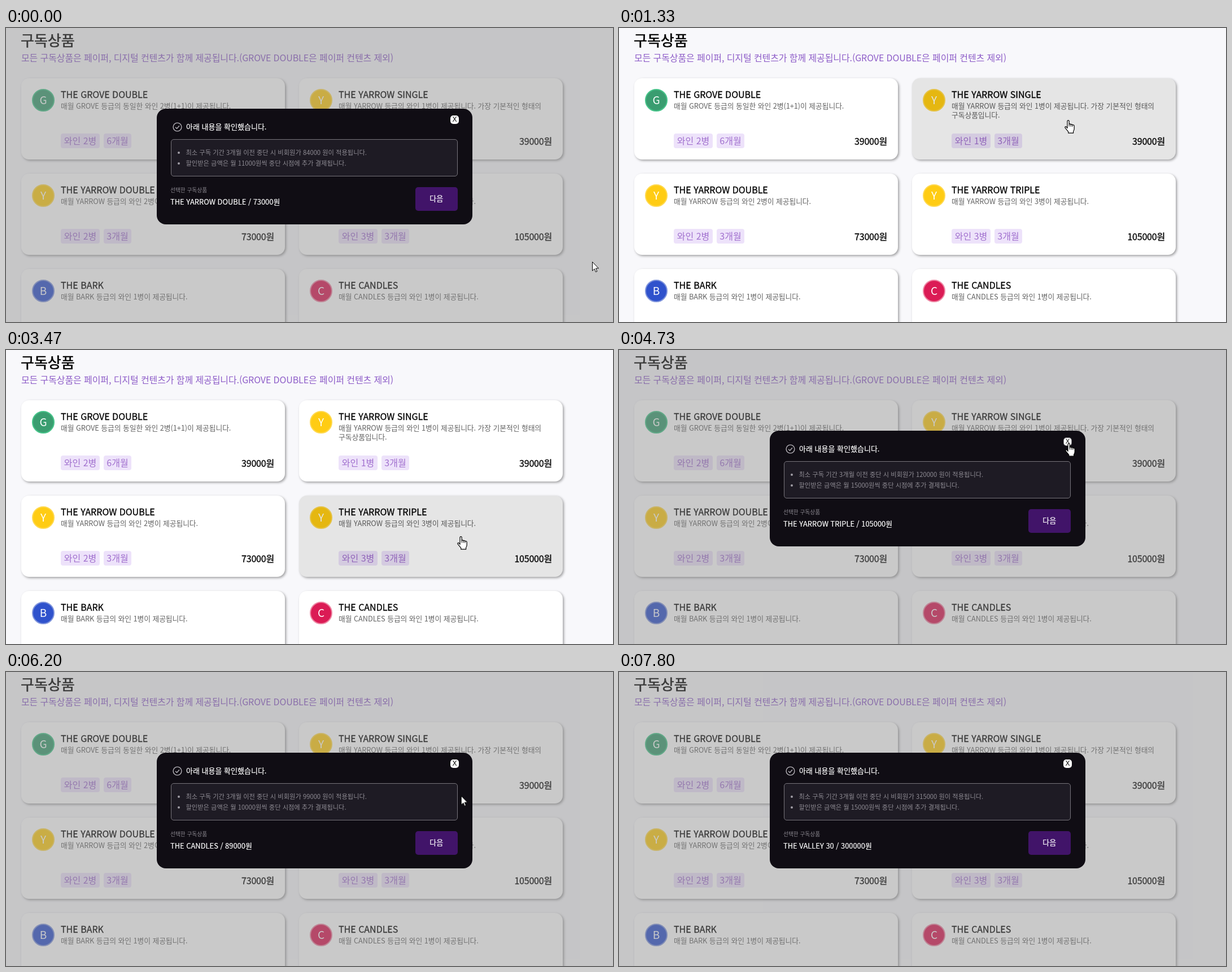
Recreate the animation shown at these times as an HTML page. Size 1075 px wide and 521 px high, loop 8000 ms.

```html
<!DOCTYPE html>
<html lang="ko">
<head>
<meta charset="utf-8">
<title>구독상품</title>
<style>
  html, body { margin: 0; width: 100%; height: 100%; overflow: hidden; }
  body {
    position: relative;
    background: #f8f8fb;
    color: #000;
    font: 400 16px/20px "Noto Sans CJK KR", "Noto Sans CJK", "Noto Sans", sans-serif;
  }
  div, span, svg { position: absolute; box-sizing: border-box; white-space: pre; }
  #stage { inset: 0; overflow: hidden; }
  h1 {
    position: absolute; margin: 0; left: 26px; top: 1px;
    font-size: 26px; line-height: 40px; font-weight: 400; -webkit-text-stroke: .6px;
  }
  .lead { left: 27px; top: 42px; font-weight: 300; letter-spacing: -.1px; color: #8d5cc8; }

  .card { width: 467px; height: 144px; border-radius: 14px; background: #fff; box-shadow: 2px 2px 4px rgba(0, 0, 0, .36); }
  .badge {
    left: 19px; top: 19px; width: 40px; height: 40px; border: 2px solid; border-radius: 50%;
    color: #fff; font-size: 19px; line-height: 34px; text-align: center;
  }
  .name, .price { -webkit-text-stroke: .3px; }
  .name { left: 70px; top: 18px; }
  .desc { left: 70px; top: 41px; font-size: 12.8px; line-height: 16px; font-weight: 300; letter-spacing: -.06px; color: #636363; }
  .chip {
    left: 70px; top: 98px; width: 69px; height: 26px; border-radius: 4px; background: #ede2fa;
    color: #a06fce; font-weight: 300; line-height: 25px; text-align: center;
  }
  .chip + .chip { left: 146px; width: 49px; }
  .price { right: 19px; top: 101px; letter-spacing: -.2px; }
  .shade { inset: 0; border-radius: 14px; background: rgba(0, 0, 0, .1); opacity: 0; }

  .veil { inset: 0; background: rgba(132, 132, 132, .44); }
  .modal { left: 267px; top: 143px; width: 558.5px; height: 205px; border-radius: 16px; background: #100d14; color: #fff; }
  .check { left: 28px; top: 24px; }
  .head { left: 52px; top: 21.5px; font-size: 13px; -webkit-text-stroke: .2px; }
  .box { left: 24.5px; top: 54px; width: 508px; height: 66px; border: 1px solid #77747b; border-radius: 5px; background: #1e1b24; }
  .box span { left: 26px; font-size: 11.25px; font-weight: 300; color: #8e8b93; }
  .box span::before {
    content: ""; position: absolute; left: -15px; top: 9px; width: 4px; height: 4px;
    border-radius: 50%; background: #a19ea6;
  }
  .label { left: 24px; top: 134px; font-size: 9.7px; font-weight: 300; color: #8e8b93; }
  .pick { left: 24px; top: 154.5px; font-size: 12.9px; -webkit-text-stroke: .2px; }
  .next {
    left: 458px; top: 138.5px; width: 74.5px; height: 42px; border-radius: 5px; background: #411469;
    font-size: 13px; line-height: 40px; text-align: center; -webkit-text-stroke: .2px;
  }
  .close {
    left: 520px; top: 12px; width: 15px; height: 15px; border-radius: 5px; background: #fff;
    color: #000; font: 12px/15px "Liberation Sans", sans-serif; text-align: center;
  }
  #cursor { left: 0; top: 0; width: 0; height: 0; }
  #cursor svg { left: 0; top: 0; overflow: visible; stroke: #000; fill: #fff; stroke-linejoin: round; }
  #cursor #hand { left: -6px; }
</style>
</head>
<body>
<div id="stage">
  <h1>구독상품</h1>
  <span class="lead">모든 구독상품은 페이퍼, 디지털 컨텐츠가 함께 제공됩니다.(GROVE DOUBLE은 페이퍼 컨텐츠 제외)</span>
  <div id="cards"></div>
  <div id="modals"></div>
  <div id="cursor">
    <svg id="arrow" width="12" height="19" viewBox="0 0 12 19">
      <path d="M.5 .5V16.2L4.1 12.8L6.4 18.3L8.8 17.3L6.5 11.9H11.5Z"/>
    </svg>
    <svg id="hand" width="18" height="24" viewBox="0 0 18 24">
      <path stroke-width="1.2" d="M5 14.5V2.4Q5 .7 6.6 .7T8.2 2.4V7.4Q9.7 6.3 11.1 8Q12.7 7 13.9 8.7Q17.2 8 17.2 11.2V15.5Q17.2 18 15.6 20V23.2H6.8V20.8L1.3 14.2Q.3 12.3 1.8 11.7Q3.2 11.4 5 14.5Z"/>
      <path fill="none" d="M8.2 7.4V11.5M11.1 8V11.8M13.9 8.7V12"/>
    </svg>
  </div>
</div>
<script>
const LOOP = 8000;
const $ = id => document.getElementById(id);

function add(parent, cls, text = '') {
  const el = document.createElement(cls.startsWith('.') ? 'span' : 'div');
  el.className = cls.replace('.', '');
  el.textContent = text;
  parent.append(el);
  return el;
}

// Each key is [ms, value, easing towards the next key].
function track(el, prop, keys, easing = 'linear') {
  const last = keys[keys.length - 1];
  const all = last[0] < LOOP ? [...keys, [LOOP, last[1]]] : keys;
  el.animate(
    all.map(([ms, value, ease]) => ({ offset: ms / LOOP, [prop]: value, easing: ease || easing })),
    { duration: LOOP, iterations: Infinity });
}

// Shows an element only inside the given [from, to] spans.
function show(el, spans, on = 1, off = 0, prop = 'opacity') {
  const keys = spans[0][0] ? [[0, off]] : [];
  for (const [from, to] of spans) {
    keys.push([from, on]);
    if (to < LOOP) keys.push([to, off]);
  }
  track(el, prop, keys, 'steps(1, end)');
}

const GREEN = ['#3a9d70', '#47c48a'], YELLOW = ['#ffcc14', '#ffd94f'];
const BLUE = ['#2f52cc', '#8095dc'], RED = ['#db1b55', '#ee86a3'];
const cards = [
  ['GROVE DOUBLE', GREEN, '동일한 와인 2병(1+1)이 제공됩니다.', 2, 6, 39000],
  ['YARROW SINGLE', YELLOW, '와인 1병이 제공됩니다. 가장 기본적인 형태의\n구독상품입니다.', 1, 3, 39000],
  ['YARROW DOUBLE', YELLOW, '와인 2병이 제공됩니다.', 2, 3, 73000],
  ['YARROW TRIPLE', YELLOW, '와인 3병이 제공됩니다.', 3, 3, 105000],
  ['BARK', BLUE, '와인 1병이 제공됩니다.', 1, 3, 45000],
  ['CANDLES', RED, '와인 1병이 제공됩니다.', 1, 3, 89000]
];

const shades = cards.map(([name, [fill, rim], text, bottles, months, price], i) => {
  const card = add($('cards'), 'card');
  card.style.left = (i % 2 ? 519 : 27) + 'px';
  card.style.top = 88.6 + (i >> 1) * 169.4 + 'px';
  const badge = add(card, 'badge', name[0]);
  badge.style.background = fill;
  badge.style.borderColor = rim;
  add(card, '.name', 'THE ' + name);
  add(card, '.desc', `매월 ${name.split(' ')[0]} 등급의 ${text}`);
  add(card, '.chip', `와인 ${bottles}병`);
  add(card, '.chip', `${months}개월`);
  add(card, '.price', price + '원');
  return add(card, 'shade');
});

const EASE = 'ease';
track(shades[1], 'opacity', [
  [0, 0], [930, 0, EASE], [1330, 1], [1800, 1, EASE], [2200, 0],
  [2870, 0, EASE], [3045, .7, EASE], [3335, 0],
  [4800, 0, EASE], [4964, .68, EASE], [5240, 0],
  [6870, 0, 'ease-in'], [7055, .73, EASE], [7345, 0]
]);
track(shades[3], 'opacity', [
  [0, 0], [3090, 0, EASE], [3490, 1], [3670, 1, EASE], [4070, 0],
  [4999, 0, EASE], [5160, .67, EASE], [5430, 0],
  [7078, 0, EASE], [7180, .4, EASE], [7350, 0]
]);
track(shades[5], 'opacity', [
  [0, 0], [5195, 0, EASE], [5560, 1], [5600, 1, EASE], [6000, 0],
  [7198, 0, EASE], [7320, .5, EASE], [7670, 0]
]);

const modals = [
  [0, 930, 'YARROW DOUBLE', 73000, 84000, 11000],
  [1800, 2870, 'YARROW SINGLE', 39000, 45000, 6000, 2730],
  [3670, 4800, 'YARROW TRIPLE', 105000, 120000, 15000, 4730],
  [5600, 6870, 'CANDLES', 89000, 99000, 10000],
  [7800, LOOP, 'VALLEY 30', 300000, 315000, 15000]
];

for (const [from, to, name, price, full, cut, press] of modals) {
  const layer = add($('modals'), 'layer');
  add(layer, 'veil');
  const modal = add(layer, 'modal');
  modal.innerHTML = `<svg class="check" width="17" height="17" fill="none" stroke="#b5b2b8" stroke-width="1.4">
    <circle cx="8.5" cy="8.5" r="7.4"/><path d="M5 8.7L7.6 11.2L12 6.3"/></svg>`;
  add(modal, '.head', '아래 내용을 확인했습니다.');
  const box = add(modal, 'box');
  add(box, '.', `최소 구독 기간 3개월 이전 중단 시 비회원가 ${full} 원이 적용됩니다.`).style.top = '12px';
  add(box, '.', `할인받은 금액은 월 ${cut}원씩 중단 시점에 추가 결제됩니다.`).style.top = '31px';
  add(modal, '.label', '선택한 구독상품');
  add(modal, '.pick', `THE ${name} / ${price}원`);
  add(modal, 'next', '다음');
  const close = add(modal, 'close', 'X');
  if (press) show(close, [[press, to]], 'scale(.93)', 'none', 'transform');
  show(layer, [[from, to]]);
}
for (const id of ['cards', 'modals']) $(id).style.inset = '0';
document.querySelectorAll('.layer').forEach(el => el.style.inset = '0');

const at = (x, y) => `translate(${x}px, ${y}px)`;
const GLIDE = 'ease-in-out';
track($('cursor'), 'transform', [
  [0, at(1038, 414)], [40, at(1038, 414), GLIDE], [670, at(795, 163)],
  [1870, at(795, 163), GLIDE], [2070, at(798, 163)],
  [2870, at(798, 163), GLIDE], [3270, at(805, 330)],
  [3800, at(805, 330), GLIDE], [4400, at(796, 165)],
  [4800, at(796, 165), GLIDE], [5330, at(854, 473)],
  [5700, at(854, 473), GLIDE], [6400, at(796, 168)],
  [6440, at(796, 168)], [6530, at(788, 165)],
  [6930, at(788, 165), GLIDE], [7430, at(800, 640)]
]);

const hands = [
  [600, 3045], [3090, 3670], [4330, 4964], [4999, 5160],
  [5195, 5600], [6330, 7055], [7078, 7180], [7198, LOOP]
];
show($('hand'), hands);
show($('arrow'), hands, 0, 1);
</script>
</body>
</html>
```
